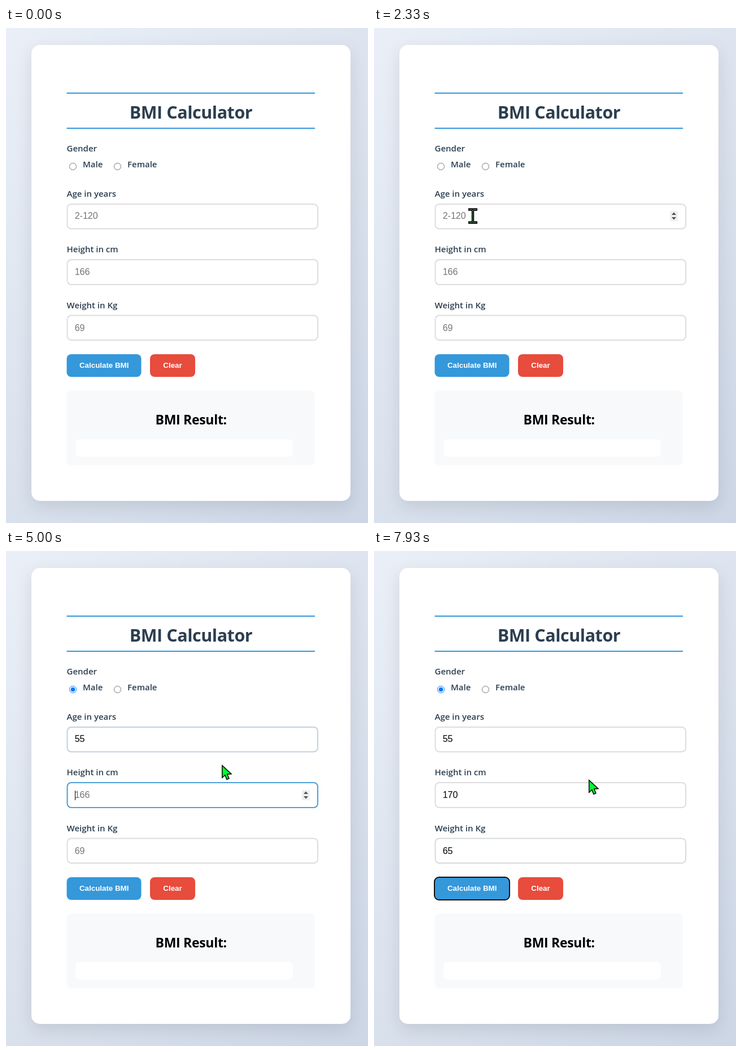
An HTML page for the animation above (8000 ms loop, 641 px wide and 874 px high).

```html
<!DOCTYPE html>
<html lang="en">
<head>
<meta charset="utf-8">
<title>BMI Calculator</title>
<style>
  html, body { margin: 0; width: 100%; height: 100%; overflow: hidden; }
  body { position: relative; background: linear-gradient(135deg, #eaeff7, #ccd6e5); }
  .card {
    position: absolute; left: 45px; top: 30px; width: 565px; height: 805px;
    border-radius: 15px; background: #fff; box-shadow: 0 10px 30px rgba(0, 0, 0, .1);
  }
  svg { position: absolute; left: 0; top: 0; }
  text { white-space: pre; }
  .title, .heading { font: 700 30.5px "Open Sans", "Noto Sans", sans-serif; text-anchor: middle; }
  .title { fill: #2c3e50; letter-spacing: -.46px; }
  .heading { font-size: 23px; letter-spacing: -.3px; }
  .label { font: 600 15px "Open Sans", "Noto Sans", sans-serif; fill: #2c3e50; }
  .value { font: 16px "Liberation Sans", Arial, sans-serif; }
  .button { font: 700 13.33px "Liberation Sans", Arial, sans-serif; fill: #fff; text-anchor: middle; }
  .border { fill: none; stroke-width: 2; }
</style>
</head>
<body>
<div class="card"></div>
<svg id="stage" width="641" height="874" viewBox="0 0 641 874">
  <path d="M107.5 115H547M107.5 177H547" stroke="#3498db" stroke-width="2"/>
  <text class="title" x="327.5" y="160">BMI Calculator</text>
  <text class="label" x="107.5" y="218">Gender</text>
  <text class="label" x="136" y="246">Male</text>
  <text class="label" x="215" y="246">Female</text>
  <g fill="#fff" stroke="#767676">
    <circle id="male" cx="118.5" cy="244.5" r="6"/>
    <circle cx="197.5" cy="244.5" r="6"/>
  </g>
  <circle id="dot" cx="118.5" cy="244.5" r="3.8" fill="#0075ff"/>

  <g id="fields"></g>

  <rect x="107.5" y="576" width="132" height="40" rx="8" fill="#3498db"/>
  <rect id="ring" x="107" y="576" width="133" height="40" rx="8" fill="none" stroke="#101010" stroke-width="2"/>
  <rect x="255" y="576" width="80" height="40" rx="8" fill="#e74c3c"/>
  <text class="button" x="173.7" y="600">Calculate BMI</text>
  <text class="button" x="295" y="600">Clear</text>

  <rect x="107.5" y="640" width="439.5" height="132" rx="8" fill="#f8f9fb"/>
  <text class="heading" x="327.7" y="700">BMI Result:</text>
  <rect x="123" y="726" width="385" height="31" rx="8" fill="#fff"/>

  <path id="arrow" d="M.8 1.6V23.2L5.8 18.7 9 26.4 13 24.7 9.8 17.2 17 16.6Z"
        fill="#0f3" stroke="#000" stroke-width="1.5"/>
  <g id="beam" fill="none">
    <path d="M-8-11.5H-1.5L0-10 1.5-11.5H8M-8 11.5H-1.5L0 10 1.5 11.5H8M0-11V11" stroke="#000" stroke-width="4.4"/>
    <path d="M-6.5-11.5H-1.5L0-10 1.5-11.5H6.5M-6.5 11.5H-1.5L0 10 1.5 11.5H6.5M0-10V10" stroke="#5c9a63"/>
  </g>
</svg>
<script>
const LOOP = 8000, STEP = 200 / 3, FADE = 300, BLINK = 533;
const $ = id => document.getElementById(id);
const show = (el, on) => el.setAttribute('visibility', on ? 'visible' : 'hidden');

// typed: moments at which each character of the value appears
const fields = [
  { label: 'Age in years', hint: '2-120', value: '55', top: 310, height: 45.5, mid: 332,
    labelY: 298, textY: 337, focus: 3266, blur: 4866, typed: [4533, 4666] },
  { label: 'Height in cm', hint: '166', value: '170', top: 408, height: 46, mid: 431,
    labelY: 396, textY: 436, focus: 4866, blur: 6000, typed: [5400, 5600, 5800] },
  { label: 'Weight in Kg', hint: '69', value: '65', top: 506.5, height: 45.5, mid: 529.5,
    labelY: 495, textY: 535, focus: 6000, blur: 7733, typed: [7133, 7266] }
];

// pointer tracks: [time, x, y]
const tracks = [
  { from: 200, to: 533, points: [[200, 18, 157], [266, 28, 112]] },
  { from: 733, to: LOOP, points: [
    [733, 455, 423], [933, 404, 414], [1066, 376, 402], [1266, 266, 345], [1400, 188, 300],
    [1533, 146, 264], [1866, 124, 245], [2000, 124, 245], [2133, 142, 290], [2333, 175, 332],
    [2466, 168, 323], [2666, 130, 258], [2800, 118, 247], [2933, 121, 251], [3066, 142, 295],
    [3200, 168, 331], [3266, 173, 333], [3333, 205, 338], [3466, 330, 366], [3600, 382, 377],
    [7666, 382, 377], [7933, 380, 403]] }
];

function add(parent, tag, attrs, text = '') {
  const el = document.createElementNS('http://www.w3.org/2000/svg', tag);
  for (const key in attrs) el.setAttribute(key, attrs[key]);
  el.textContent = text;
  return parent.appendChild(el);
}

for (const f of fields) {
  const g = $('fields');
  const box = { class: 'border', x: 108.5, y: f.top + 1, width: 443.5, height: f.height - 2, rx: 7 };
  add(g, 'text', { class: 'label', x: 107.5, y: f.labelY }, f.label);
  add(g, 'rect', { ...box, stroke: '#ddd' });
  f.glow = add(g, 'rect', { ...box, stroke: '#3498db' });
  f.text = add(g, 'text', { class: 'value', x: 121.7, y: f.textY });
  f.caret = add(g, 'rect', { y: f.textY - 13, width: 1, height: 17 });
  f.spin = add(g, 'g', { transform: `translate(524 ${f.mid})` });
  add(f.spin, 'rect', { y: -9, width: 14, height: 18, fill: '#efefef' });
  add(f.spin, 'path', { d: 'M3-2 7-6.5 11-2ZM3 2 7 6.5 11 2Z', fill: '#505050' });
}

function pointerAt(t) {
  const track = tracks.find(k => t >= k.from && t < k.to);
  if (!track) return null;
  const pts = track.points;
  const i = pts.findIndex(p => p[0] > t);
  if (i < 0) return pts[pts.length - 1].slice(1);
  const [t0, x0, y0] = pts[i - 1], [t1, x1, y1] = pts[i];
  const k = (t - t0) / (t1 - t0);
  return [x0 + (x1 - x0) * k, y0 + (y1 - y0) * k];
}

const inside = (f, p) =>
  !!p && p[0] > 107 && p[0] < 553 && p[1] > f.top && p[1] < f.top + f.height;

const fade = t => 1 - Math.pow(1 - Math.min(1, Math.max(0, t / FADE)), 2.3);

function drawField(f, t, hover) {
  const focused = t >= f.focus && t < f.blur;
  const count = f.typed.filter(at => t >= at).length;
  const since = t - (count ? f.typed[count - 1] : f.focus);
  f.text.textContent = count ? f.value.slice(0, count) : f.hint;
  f.text.setAttribute('fill', count ? '#000' : '#757575');
  f.caret.setAttribute('x', Math.round(122 + count * 8.9));
  f.glow.setAttribute('opacity', fade(t - f.focus + STEP / 2) - fade(t - f.blur + STEP / 2));
  show(f.caret, focused && Math.floor((since + 1) / BLINK) % 2 === 0);
  show(f.spin, focused || hover);
}

function draw(now) {
  const t = Math.floor((now % LOOP + 5) / STEP) * STEP + .5;
  const p = pointerAt(t), before = pointerAt(t - STEP) || p;
  const beam = fields.some(f => inside(f, p));
  fields.forEach(f => drawField(f, t, !!p && inside(f, before)));

  const checked = t >= 2800;
  $('male').setAttribute('stroke', checked ? '#0075ff' : '#767676');
  show($('dot'), checked);
  show($('ring'), t >= 7733);

  show($('arrow'), p && !beam);
  show($('beam'), beam);
  if (p) {
    const at = `translate(${Math.round(p[0])} ${Math.round(p[1])})`;
    $('arrow').setAttribute('transform', at);
    $('beam').setAttribute('transform', at);
  }
}

const start = performance.now();
function tick() {
  draw(performance.now() - start);
  requestAnimationFrame(tick);
}
tick();
</script>
</body>
</html>
```
